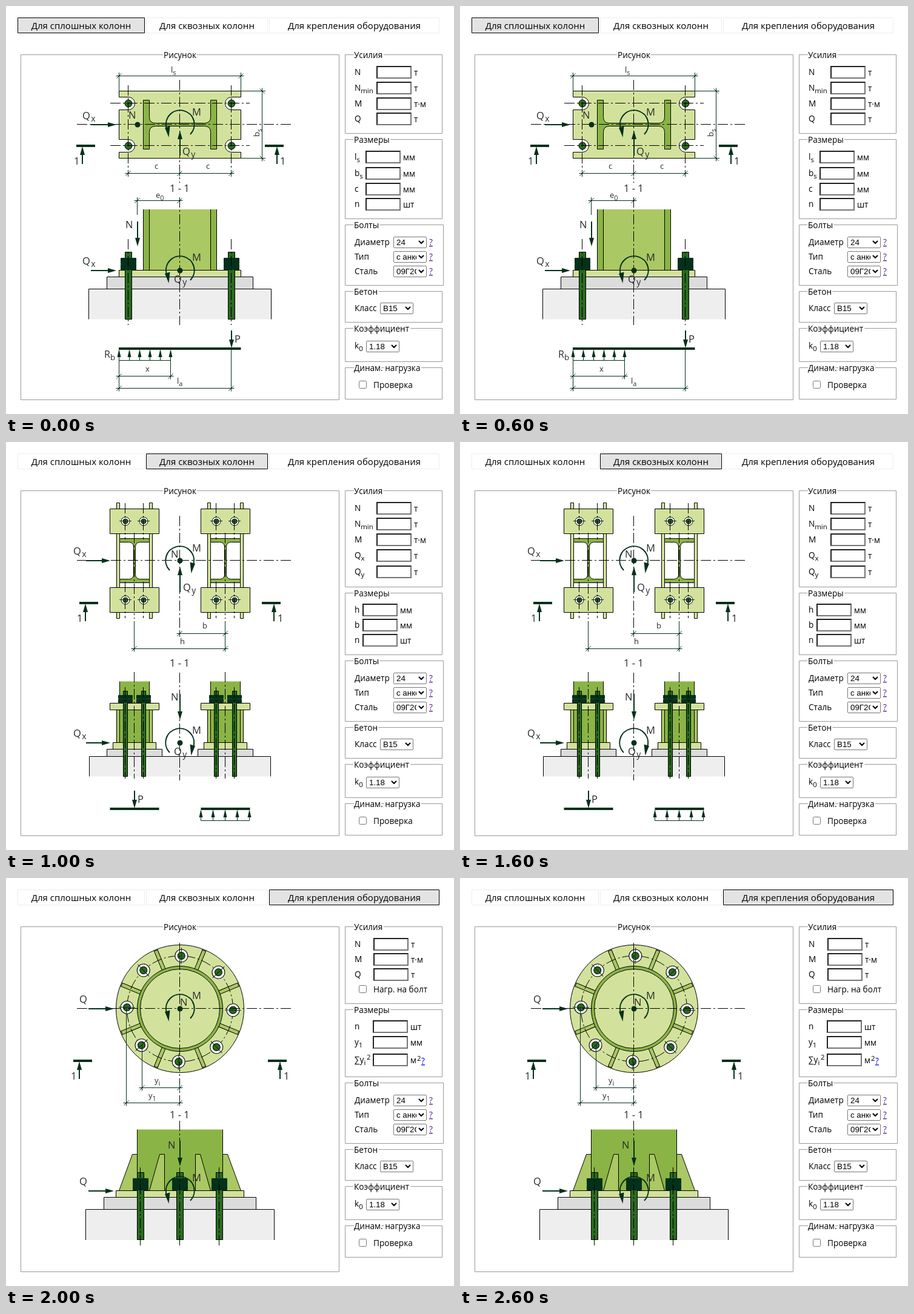
These frames come from a looping animation (739 by 674 pixels, 3000 ms). An HTML page:

```html
<!DOCTYPE html>
<html lang="ru">
<meta charset="utf-8">
<title>Расчёт базы колонны</title>
<style>
html, body { margin: 0; width: 100%; height: 100%; overflow: hidden; background: #fff; }
.scene { position: absolute; left: 0; top: 0; width: 739px; height: 674px; }
.scene[hidden] { display: none; }
svg { position: absolute; left: 0; top: 0; }
text { font-family: "Open Sans", "Noto Sans", sans-serif; white-space: pre; }
.legend { paint-order: stroke; stroke: #fff; stroke-width: 5; }
input, select { position: absolute; margin: 0; box-sizing: border-box; }
input[type=text] { width: 58px; height: 21px; border: 2px inset #767676; background: #fff; }
input[type=checkbox] { width: 13px; height: 13px; }
select { width: 55px; height: 19px; font: 13.333px "Liberation Sans", Arial, sans-serif; }
</style>
<body>
<script>
const INK = '#05301a', LIGHT = '#d2e29c', MID = '#aac864', GREEN = '#8ab445',
      BOLT = '#2a6a20', PAD = '#dcdcdc', CONCRETE = '#eee';
// Middle of the shapes, and the pixel column of their hairlines
const CX = 287, MX = 286.5;

// Shapes
const path = (d, fill = 'none', stroke = '#000', width = 1, more = '') =>
  `<path d="${d}" fill="${fill}" stroke="${stroke}" stroke-width="${width}" ${more}/>`;
const box = (x, y, x2, y2, fill, stroke) => path(`M${x} ${y}H${x2}V${y2}H${x}Z`, fill, stroke);
const open = (x, y, x2, y2, fill) => path(`M${x} ${y2}V${y}H${x2}V${y2}`, fill);
const circle = (x, y, r, fill, more = '') =>
  `<circle cx="${x}" cy="${y}" r="${r}" fill="${fill}" stroke="#000" ${more}/>`;
const line = (x, y, x2, y2, width = 1) => path(`M${x} ${y}L${x2} ${y2}`, 'none', INK, width);
const DASH = 'stroke-dasharray="17 4 3 4"';
const axis = (x, y, x2, y2) => path(`M${x} ${y}L${x2} ${y2}`, 'none', '#000', 1, DASH);
const axisV = (x, y, y2) => axis(x - .5, y, x - .5, y2);
const dot = (x, y) => `<circle cx="${x}" cy="${y}" r="4.5" fill="${INK}"/>`;
const each = (list, draw) => list.map(draw).join('');

// Text: "Q_x" sets x as a subscript
const text = (x, y, s, size = 16.5, more = 'fill="#262b28"', gap = 1.5) =>
  `<text x="${x}" y="${y}" font-size="${size}" ${more}>` +
  s.replace(/_(\w+)/, `<tspan dx="${gap}" dy="4" font-size="${size * .84}">$1</tspan>`) + '</text>';
const small = (x, y, s) => text(x, y, s, 13, 'fill="#262b28"', 0);
const label = (x, y, s, more = '') => text(x, y, s, 13.6, more, 0);
const help = (x, y, color = '#551a8b') =>
  label(x, y, '?', `fill="${color}" text-decoration="underline"`);

// Drawing marks
function arrow(x, y, x2, y2, width = 2, head = 14, half = 4) {
  const length = Math.hypot(x2 - x, y2 - y);
  const angle = Math.atan2(y2 - y, x2 - x) * 180 / Math.PI;
  return `<g transform="translate(${x2} ${y2}) rotate(${angle})">` +
    line(-length, 0, 2 - head, 0, width) +
    `<path d="M0 0L${-head} ${-half}V${half}Z" fill="${INK}"/></g>`;
}
const moment = (y, side = 1) =>
  `<g transform="translate(${CX} ${y}) scale(${side} 1)">` +
  path('M17 16A23.4 23.4 0 1 0 -22.5 5', 'none', INK, 2) +
  `<path d="M-18.5 21L-25 5L-16.5 2.5Z" fill="${INK}"/></g>`;
const dimension = (y, ...xs) => line(xs[0] - 5, y, xs[xs.length - 1] + 5, y) +
  each(xs, x => line(x, y - 5, x, y + 5) + line(x - 4, y + 4, x + 4, y - 4));
const cut = (x, y, arrowX, textX) =>
  line(x, y, x + 31, y, 4) + arrow(arrowX, y + 30, arrowX, y + 1) + text(textX, y + 31, '1');
const loads = (x, step, count, top) => line(x, top + 18.5, x + step * (count - 1), top + 18.5) +
  each([...Array(count).keys()], i => arrow(x + i * step, top + 18.5, x + i * step, top, 1, 13, 3));
const bolt = (x, y, bottom, half, nuts, nutHalf, nutHeight) =>
  box(x - half, y, x + half, bottom, BOLT) +
  each([0, 1], i => box(x - nutHalf, nuts + i * (nutHeight + 1), x + nutHalf,
    nuts + i * (nutHeight + 1) + nutHeight, INK, INK));

// Form parts
const field = (x, y) => `<input type="text" style="left:${x}px;top:${y}px">`;
const check = (x, y) => `<input type="checkbox" style="left:${x}px;top:${y}px">`;
const pick = (x, y, s) => `<select style="left:${x}px;top:${y}px"><option>${s}</select>`;
const group = (title, y, y2, x2 = 719.5) =>
  box(559.5, y, x2, y2, 'none', '#999') + label(574, y + 5.5, title, 'class="legend"');
const rows = (x, list) => ({
  svg: each(list, ([y, name, unit]) => label(575, y + 15, name) + label(x + 62, y + 16, unit)),
  html: each(list, ([y]) => field(x, y))
});

const TABS = [['Для сплошных колонн', 19.5, 228.5], ['Для сквозных колонн', 231.5, 431.5],
  ['Для крепления оборудования', 434.5, 714.5]];
const tabs = active => each(TABS, ([title, x, x2], i) =>
  box(x, 19.5, x2, 44.5, i == active ? '#e3e3e3' : '#fff', i == active ? '#000' : '#eee') +
  text((x + x2) / 2, 38, title, 15, 'text-anchor="middle"'));

function solidColumn() {
  const bolts = [202, 372], levels = [161, 231];
  return path('M186.5 140.5H387.5V150.5H372a10.5 10.5 0 0 0 0 21H387.5V220.5H372a10.5 10.5 0 0 0 0 21H387.5V251.5' +
      'H186.5V241.5H202a10.5 10.5 0 0 0 0-21H186.5V171.5H202a10.5 10.5 0 0 0 0-21H186.5Z', LIGHT) +
    path('M226.5 155.5H236.5V183.5q0 10 10 10H327.5q10 0 10-10V155.5H347.5V236.5H337.5V208.5' +
      'q0-10-10-10H246.5q-10 0-10 10V236.5H226.5Z', GREEN) +
    each(bolts, x => each(levels, y => circle(x, y, 6, BOLT)) + axisV(x, 131, 282)) +
    each(levels, y => axis(172, y - .5, 402, y - .5)) +
    axis(117, 195.5, 472, 195.5) + axisV(CX, 122, 292) +
    dot(217, 196) + moment(196) + arrow(140, 196, 182, 196) + arrow(287, 247, 287, 206) +
    text(126, 187, 'Q_x') + text(202, 186, 'N') + text(307, 181, 'M') + text(291, 246, 'Q_y') +
    cut(116, 231, 126, 112) + cut(427, 231, 447, 452) +
    dimension(115.5, 186.5, 387.5) + each([186.5, 387.5], x => line(x, 110, x, 140)) +
    small(272, 110, 'l_s') +
    `<g transform="translate(422.5 0) rotate(90)">${dimension(0, 140.5, 251.5)}</g>` +
    line(388, 140.5, 428, 140.5) + line(388, 251.5, 428, 251.5) +
    `<g transform="translate(418 216) rotate(-90)">${small(0, 0, 'b_s')}</g>` +
    dimension(276.5, 201.5, MX, 371.5) + small(245, 269, 'c') + small(330, 269, 'c') +
    text(270, 307, '1 - 1') +
    // section
    dimension(321.5, 216.5, MX) + line(216.5, 316, 216.5, 345) + small(247, 317, 'e_0') +
    path('M226.5 336H347.5V436.5H226.5Z', MID, 'none') +
    open(226.5, 436.5, 236.5, 336, GREEN) + open(337.5, 436.5, 347.5, 336, GREEN) +
    open(136.5, 467.5, 437.5, 517.5, CONCRETE) + box(166.5, 447.5, 407.5, 467.5, PAD) +
    box(186.5, 436.5, 387.5, 447.5, LIGHT) +
    each(bolts, x => bolt(x, 406.5, 517.5, 5.5, 416.5, 12.5, 9) + axisV(x, 385, 527)) +
    axisV(CX, 316, 527) + moment(437) + dot(CX, 437) +
    arrow(217, 356, 217, 397) + arrow(140, 437, 182, 437) +
    text(197, 367, 'N') + text(126, 427, 'Q_x') + text(307, 421, 'M') + text(277, 457, 'Q_y') +
    // load diagram
    line(186, 566, 387.5, 566, 4) + arrow(372, 536, 372, 565) + text(377, 556, 'P') +
    loads(186.5, 17, 6, 567) + text(162, 581, 'R_b', 16, 'fill="#262b28"', 0) +
    line(186.5, 585, 186.5, 636) + line(271.5, 585, 271.5, 616) + line(371.5, 568, 371.5, 636) +
    dimension(611.5, 186.5, 271.5) + small(230, 604, 'x') +
    dimension(631.5, 186.5, 371.5) + small(282, 624, 'l_a');
}

function branchPlan(c) {
  const bolts = [c - 15, c + 15];
  return each([c - 29.5, c + 24.5], x => box(x, 100.5, x + 5, 291.5, LIGHT)) +
    path(`M${c - 24.5} 159.5h49v6h-15q-8 0-8 8v45q0 8 8 8h15v6h-49v-6h15q8 0 8-8v-45q0-8-8-8h-15Z`, GREEN) +
    each([110.5, 240.5], y => box(c - 40.5, y, c + 40.5, y + 41, LIGHT)) +
    each(bolts, x => each([131, 261], y => circle(x, y, 7, '#fff') + circle(x, y, 4, BOLT) +
      axisV(x, y - 30, y + 30) + line(x - 10, y - .5, x + 10, y - .5))) +
    axisV(c, 150, 292) + line(c - .5, 296, c - .5, 346);
}

function branchSection(c) {
  return open(c - 24.5, 442, c + 24.5, 395.5, GREEN) +
    box(c - 29.5, 442.5, c + 29.5, 496.5, MID) + box(c - 24.5, 442.5, c + 24.5, 496.5, GREEN) +
    box(c - 45.5, 507.5, c + 45.5, 519.5, PAD) + box(c - 35.5, 496.5, c + 35.5, 507.5, LIGHT) +
    box(c - 40.5, 431.5, c + 40.5, 442.5, LIGHT) +
    each([c - 15, c + 15], x => bolt(x, 411.5, 552.5, 3.5, 418.5, 11.5, 5.5) + axisV(x, 405, 556)) +
    axisV(c, 380, 556);
}

function twinColumn() {
  const centers = [212, 362];
  return each(centers, branchPlan) + axis(117, 195.5, 472, 195.5) + axisV(CX, 122, 322) +
    moment(196, -1) + dot(CX, 196) + arrow(132, 196, 172, 196) + arrow(287, 248, 287, 206) +
    text(111, 186, 'Q_x') + text(272, 191, 'N') + text(307, 181, 'M') + text(292, 246, 'Q_y') +
    cut(121, 266, 131, 117) + cut(422, 266, 442, 448) +
    dimension(316.5, MX, 361.5) + small(324, 308, 'b') +
    dimension(341.5, 211.5, 361.5) + small(287, 334, 'h') + text(270, 371, '1 - 1') +
    // section
    open(137.5, 519.5, 436.5, 552.5, CONCRETE) + each(centers, branchSection) +
    axisV(CX, 381, 559) + moment(497, -1) + dot(CX, 497) +
    arrow(287, 416, 287, 459) + arrow(132, 497, 172, 497) +
    text(272, 427, 'N') + text(111, 487, 'Q_x') + text(307, 482, 'M') + text(277, 517, 'Q_y') +
    // load diagram
    line(171.5, 606, 252.5, 606, 4) + arrow(212, 576, 212, 605) + text(217, 596, 'P') +
    line(321.5, 606, 402.5, 606, 4) + loads(321.5, 20, 5, 607);
}

function equipment() {
  const bolts = [222, CX, 352], eighths = [...Array(8).keys()], CY = 216;
  const spin = (angle, s) => `<g transform="rotate(${angle} ${CX} ${CY})">${s}</g>`;
  const rib = (x, side, run) => path(`M${x} 516.5V456.5h${8 * side}l${run * side} 60Z`, MID);
  return circle(CX, CY, 105.5, LIGHT) +
    each(eighths, i => spin(22.5 + i * 45, box(CX - 3, 112, CX + 3, 146.5, MID))) +
    circle(CX, CY, 70.5, GREEN) + circle(CX, CY, 65.5, LIGHT) +
    circle(CX, CY, 87.5, 'none', DASH) +
    each(eighths, i => spin(1.5 + i * 45, circle(CX, 128.5, 10.5, '#fff') + circle(CX, 128.5, 6, BOLT) +
      line(CX, 115, CX, 142))) +
    axis(117, 215.5, 472, 215.5) + axisV(CX, 107, 376) +
    moment(CY) + dot(CX, CY) + arrow(136, CY, 178, CY) +
    text(121, 206, 'Q') + text(287, 211, 'N') + text(307, 200, 'M') +
    cut(111, 302, 121, 107) + cut(432, 302, 452, 458) +
    line(224.5, 276, 224.5, 351) + line(198.5, 214, 198.5, 376) +
    dimension(346.5, 224.5, MX) + small(245, 339, 'y_i') +
    dimension(371.5, 198.5, MX) + small(235, 364, 'y_1') + text(270, 397, '1 - 1') +
    // section
    open(216.5, 516.5, 357.5, 415.5, GREEN) +
    rib(216.5, -1, 22) + rib(261.5, -1, 17) + rib(312.5, 1, 17) + rib(357.5, 1, 22) +
    open(131.5, 547.5, 442.5, 598, CONCRETE) + box(161.5, 527.5, 412.5, 547.5, PAD) +
    box(181.5, 516.5, 392.5, 527.5, LIGHT) +
    each(bolts, x => bolt(x, 486.5, 597.5, 5.5, 496.5, 12.5, 9) + axisV(x, 478, 608)) +
    axisV(CX, 401, 480) + moment(517) + arrow(287, 434, 287, 476) +
    arrow(136, 517, 178, 517) +
    text(267, 447, 'N') + text(121, 507, 'Q') + text(307, 501, 'M');
}

// Lower panels, moved up by "lift"
function settings(lift) {
  const steel = [['Диаметр', '24'], ['Тип', 'с анкерной плитой'], ['Сталь', '09Г2С']];
  return {
    svg: `<g transform="translate(0 ${-lift})">` + group('Болты', 361.5, 461.5, 721.5) +
      each(steel, ([name], i) => label(575, 395 + i * 24, name) + help(698, 395 + i * 24)) +
      group('Бетон', 471.5, 522.5) + label(575, 504, 'Класс') +
      group('Коэффициент', 532.5, 587.5) + label(575, 566, 'k_0') +
      group('Динам. нагрузка', 597.5, 649.5) + label(606, 631, 'Проверка') + '</g>',
    html: each(steel, ([, value], i) => pick(639, 381 + i * 24 - lift, value)) +
      pick(617, 490 - lift, 'B15') + pick(594, 553 - lift, '1.18') + check(582, 619 - lift)
  };
}

const FORMS = [
  [group('Усилия', 80.5, 210.5) + group('Размеры', 220.5, 351.5), '', 0,
    rows(611, [[99, 'N', 'т'], [125, 'N_min', 'т'], [151, 'M', 'т·м'], [176, 'Q', 'т']]),
    rows(593, [[239, 'l_s', 'мм'], [266, 'b_s', 'мм'], [292, 'c', 'мм'], [317, 'n', 'шт']])],
  [group('Усилия', 80.5, 239.5) + group('Размеры', 249.5, 351.5), '', 0,
    rows(611, [[99, 'N', 'т'], [125, 'N_min', 'т'], [151, 'M', 'т·м'], [177, 'Q_x', 'т'], [204, 'Q_y', 'т']]),
    rows(588, [[267, 'h', 'мм'], [292, 'b', 'мм'], [317, 'n', 'шт']])],
  [group('Усилия', 80.5, 207.5) + group('Размеры', 217.5, 328.5) + label(606, 189, 'Нагр. на болт') +
    text(595, 300, '2', 11.4, '') + text(678, 302, '2', 11.4, '') + help(685, 307, '#0000ee'),
    check(582, 177), 23,
    rows(606, [[99, 'N', 'т'], [124, 'M', 'т·м'], [149, 'Q', 'т']]),
    rows(605, [[235, 'n', 'шт'], [261, 'y_1', 'мм'], [290, '∑y_i', 'м']])]
];

const scenes = [solidColumn, twinColumn, equipment].map((drawing, i) => {
  const [svg, html, lift, ...parts] = FORMS[i];
  parts.push(settings(lift));
  const scene = document.createElement('div');
  scene.className = 'scene';
  scene.innerHTML = '<svg width="739" height="674">' + tabs(i) +
    box(24.5, 80.5, 549.5, 650.5, 'none', '#999') +
    label(287, 86, 'Рисунок', 'class="legend" text-anchor="middle"') +
    drawing() + svg + each(parts, p => p.svg) + '</svg>' + html + each(parts, p => p.html);
  document.body.append(scene);
  return scene;
});

function show() {
  const current = Math.floor(performance.now() / 1000) % 3;
  scenes.forEach((scene, i) => scene.hidden = i != current);
  requestAnimationFrame(show);
}
show();
</script>
</body>
</html>
```
